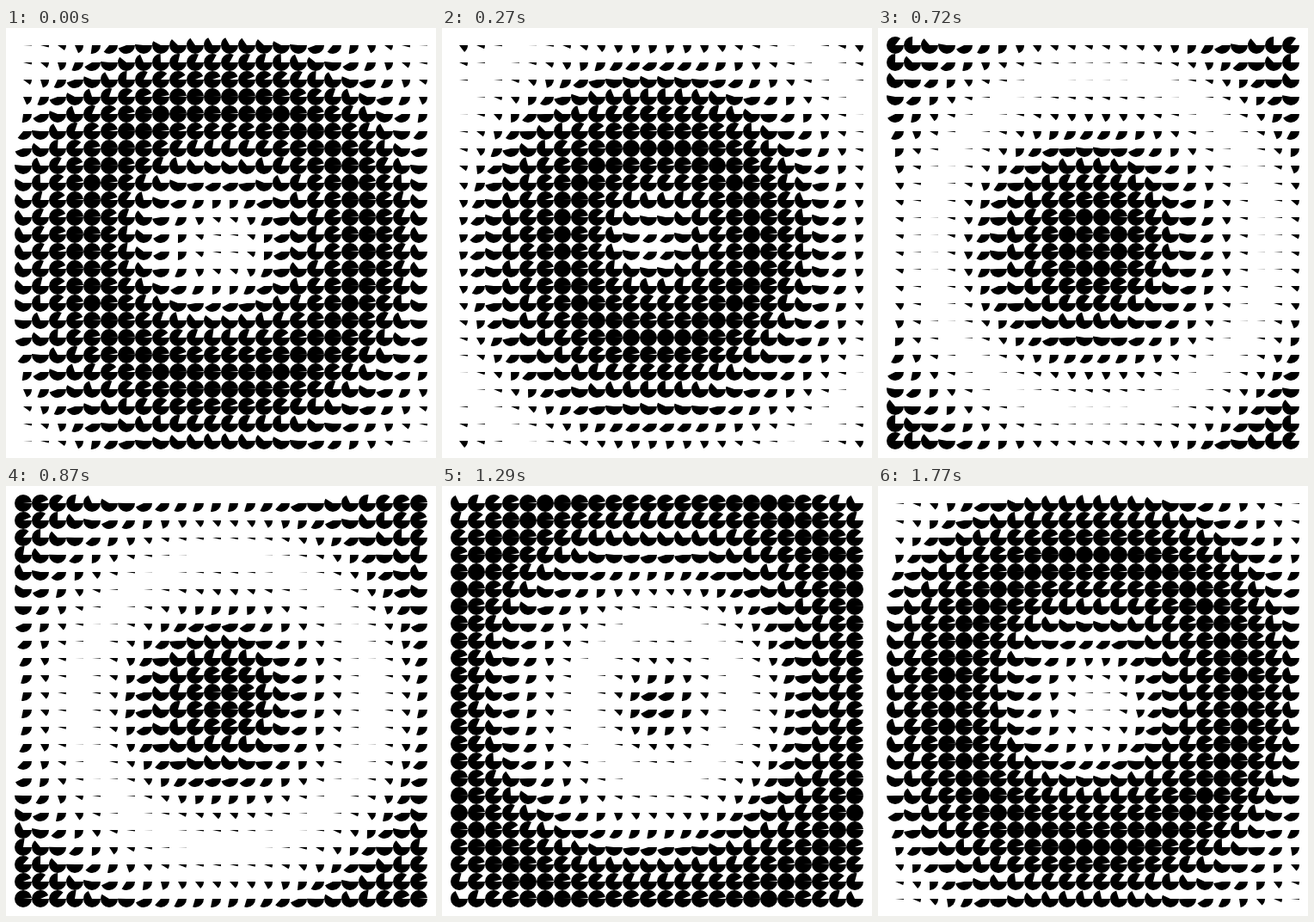
An HTML page with a canvas for the animation above (1.8 s loop, 500 px wide and 500 px high).

```html
<!DOCTYPE html>
<html>
<head>
<meta charset="utf-8">
<style>
html, body { margin: 0; width: 100%; height: 100%; overflow: hidden; background: #fff; }
canvas { display: block; }
</style>
</head>
<body>
<canvas id="stage" width="500" height="500"></canvas>
<script>
const ctx = document.getElementById('stage').getContext('2d');
const TAU = 2 * Math.PI;
const LOOP = 1800, STEP = 30;
const GAP = 20, RADIUS = 10, CENTER = 250;
const WAVELENGTH = 240 * Math.SQRT2;

function draw(now) {
  // The picture advances in 30 ms steps, with the first step already one ahead.
  const cycle = (Math.floor(now % LOOP / STEP) + 1) * STEP / LOOP;
  ctx.fillStyle = '#fff';
  ctx.fillRect(0, 0, 500, 500);
  ctx.fillStyle = '#000';
  for (let y = GAP; y < 500; y += GAP) {
    for (let x = GAP; x < 500; x += GAP) {
      const dist = Math.hypot(x - CENTER, y - CENTER);
      const share = (1 - Math.cos(TAU * (dist / WAVELENGTH + cycle))) / 2;
      ctx.beginPath();
      ctx.moveTo(x, y);
      ctx.arc(x, y, RADIUS, 0, TAU * share);
      ctx.fill();
    }
  }
  requestAnimationFrame(() => draw(performance.now()));
}
draw(performance.now());
</script>
</body>
</html>
```
